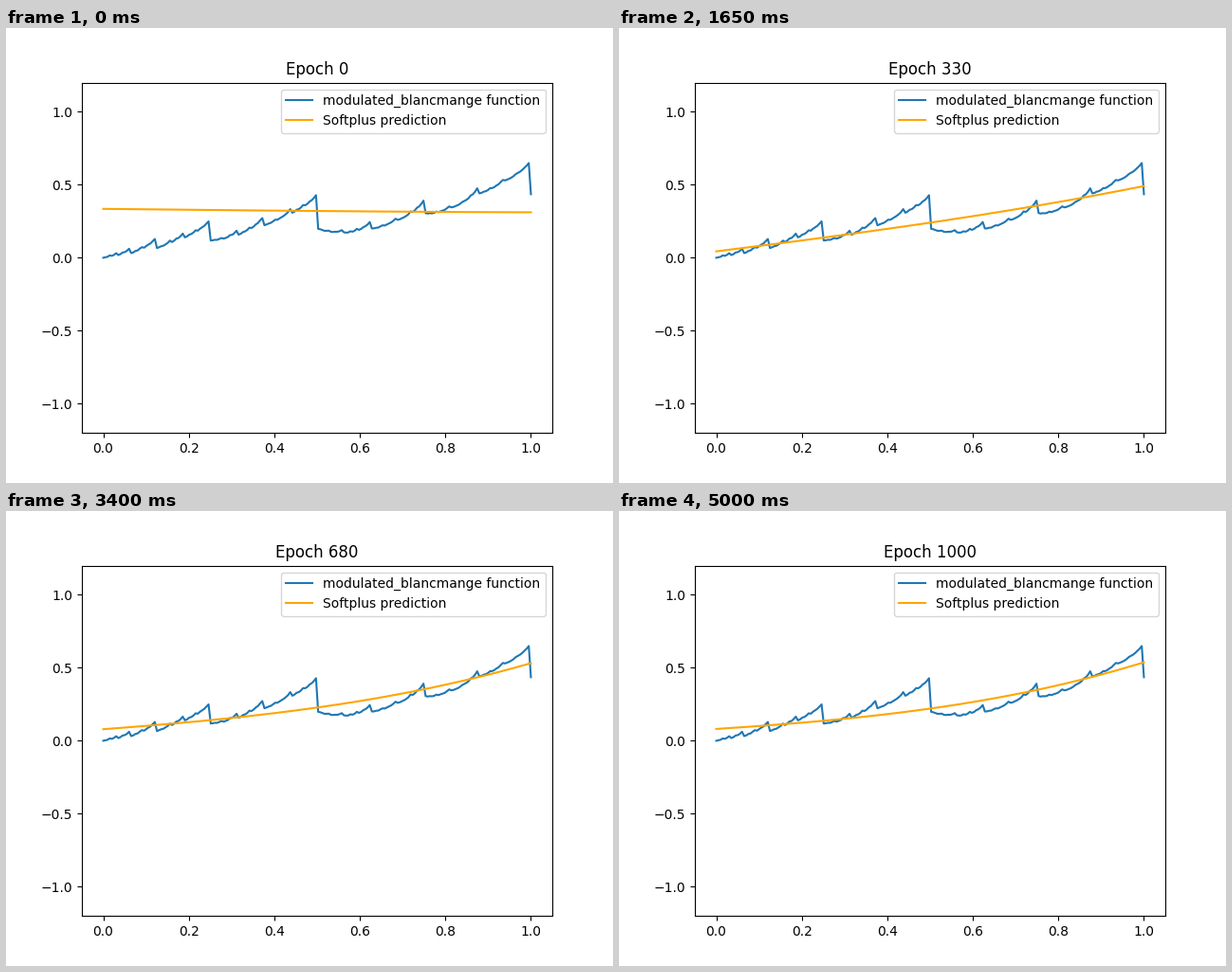
Recreate the animation shown at these times as a matplotlib script. Size 640 by 480 pixels, loop 5050 ms.

```python
import numpy as np
import matplotlib.pyplot as plt
from matplotlib.animation import FuncAnimation

FRAMES = 101
STEP_MS = 50
EPOCHS_PER_FRAME = 10
LEVELS = 10


def wave(x, u):
    """One sawtooth-like tooth over phase u, flattening as x grows."""
    return .218 * x + .36 * u**2 - x * u * (.6 - .36 * u)


def jagged(x):
    """Self-similar sum of teeth, each level half the size of the last."""
    teeth = sum(wave(x, x * 2**n % 1) / 2**n for n in range(LEVELS))
    ripple = .04 * x * np.sin(4 * np.pi * x) + .01 * np.sin(8 * np.pi * x)
    return teeth - ripple


def ramp(t, middle, width):
    return 1 / (1 + np.exp((middle - t) / width))


def prediction(x, t):
    """Line that swings into place, then slowly bends upwards."""
    swing = np.exp(-t / 2.2) * np.cos(.63 * t)
    left = .038 + .043 * ramp(t, 46, 7) + .297 * swing
    right = .465 + .073 * ramp(t, 40, 12) - .156 * swing
    sag = .09 * ramp(t, 44, 13)
    return left + (right - left) * x - sag * x * (1 - x) * (3 + 2 * x)


x = np.linspace(0, 1, 200)
fig, ax = plt.subplots(figsize=(6.4, 4.8), dpi=100)
ax.plot(x, jagged(x), label="modulated_blancmange function")
fit_line, = ax.plot(x, prediction(x, 0), color="orange",
                    label="Softplus prediction")
ax.set_ylim(-1.2, 1.2)
ax.legend(loc="upper right")
title = ax.set_title("Epoch 0")


def update(frame):
    fit_line.set_ydata(prediction(x, frame))
    title.set_text(f"Epoch {frame * EPOCHS_PER_FRAME}")
    return fit_line, title


anim = FuncAnimation(fig, update, frames=FRAMES, interval=STEP_MS,
                     repeat=True, repeat_delay=0, blit=False)
plt.show()
```
